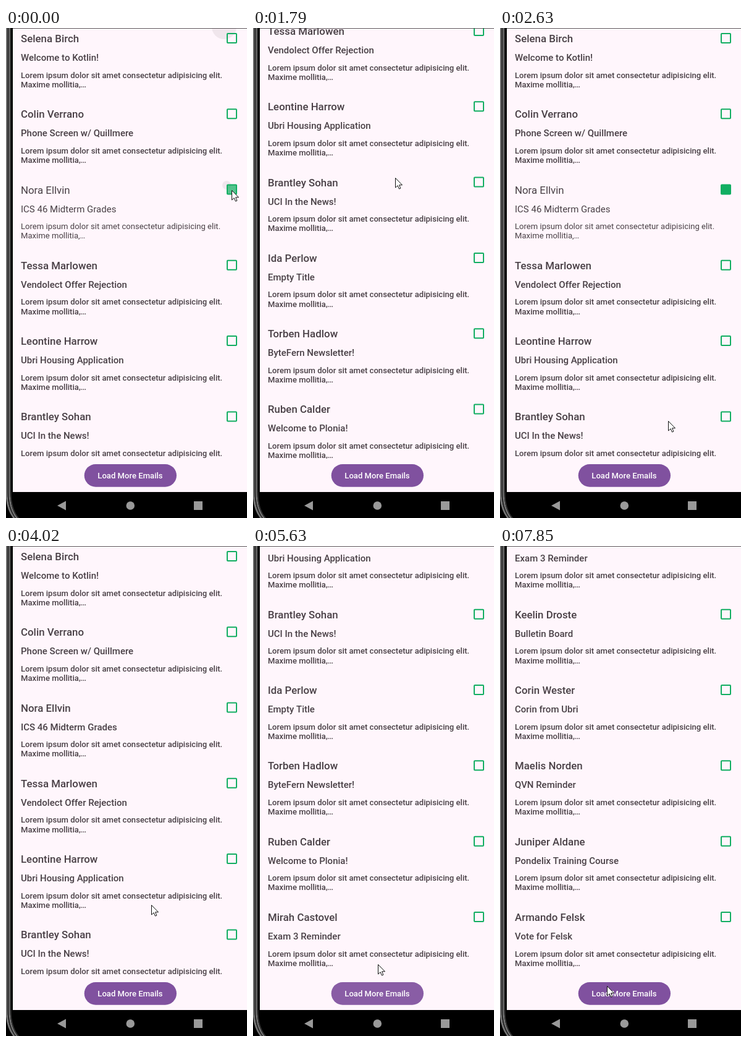
An HTML page with a canvas for the animation above (8000 ms loop, 390x792 px).

```html
<!DOCTYPE html>
<html lang="en">
<head>
<meta charset="utf-8">
<title>Email list</title>
<style>
html, body { margin: 0; width: 100%; height: 100%; overflow: hidden; background: #fff6fc; }
canvas { display: block; width: 390px; height: 792px; }
</style>
</head>
<body>
<canvas id="stage"></canvas>
<script>
const W = 390, H = 792, LOOP = 8000;
const STEP = LOOP / 58;           // the screen refreshes once per step
const PITCH = 122.28, LIST_BOTTOM = 696, NAV_TOP = 750;
const BG = '#fff6fc', INK = '#494046', GREEN = '#12ae62', PURPLE = '#80519f';
const READ_ROW = 2, UNCHECK = 27, PRESS = 39, HIT_END = 51;

const canvas = document.getElementById('stage');
const ctx = canvas.getContext('2d');
const dpr = window.devicePixelRatio || 1;
canvas.width = W * dpr;
canvas.height = H * dpr;

const mails = [
  ['Selena Birch', 'Welcome to Kotlin!'],
  ['Colin Verrano', 'Phone Screen w/ Quillmere'],
  ['Nora Ellvin', 'ICS 46 Midterm Grades'],
  ['Tessa Marlowen', 'Vendolect Offer Rejection'],
  ['Leontine Harrow', 'Ubri Housing Application'],
  ['Brantley Sohan', 'UCI In the News!'],
  ['Ida Perlow', 'Empty Title'],
  ['Torben Hadlow', 'ByteFern Newsletter!'],
  ['Ruben Calder', 'Welcome to Plonia!'],
  ['Mirah Castovel', 'Exam 3 Reminder'],
  ['Keelin Droste', 'Bulletin Board'],
  ['Corin Wester', 'Corin from Ubri'],
  ['Maelis Norden', 'QVN Reminder'],
  ['Juniper Aldane', 'Pondelix Training Course'],
  ['Armando Felsk', 'Vote for Felsk']
];
const maxScroll = count => count * PITCH - 705.2;

// A move runs from one step to another and ends at the given value; between moves the value rests.
const move = (from, to, ...end) => ({ from, to, end });

const scrolling = [
  move(6, 9, 127.3), move(9, 13, 378.8), move(16, 19, 0),
  move(30, 34, 294), move(34, 37, maxScroll(10)),
  move(43, 47, 956), move(47, 50, maxScroll(15))
];
const pointing = [
  move(0, 6, 227, 518), move(6, 9, 227, 380), move(9, 13, 230, 242), move(15, 19, 272, 635),
  move(20, 25, 360, 260), move(27, 29, 235, 580), move(30, 34, 218, 380),
  move(35, 38, 198, 716), move(40, 42, 206, 636), move(43, 47, 200, 321), move(48, 57, 173, 711)
];

function follow(start, moves, step) {
  return moves.reduce((at, { from, to, end }) => {
    const u = Math.min(1, Math.max(0, (step - from) / (to - from)));
    return at.map((v, i) => v + (end[i] - v) * u);
  }, start);
}

function rect(x, y, w, h, color) {
  ctx.fillStyle = color;
  ctx.fillRect(x, y, w, h);
}

function disc(x, y, r, color) {
  ctx.fillStyle = color;
  ctx.beginPath();
  ctx.arc(x, y, r, 0, Math.PI * 2);
  ctx.fill();
}

function polygon(points) {
  ctx.beginPath();
  for (const [x, y] of points) ctx.lineTo(x, y);
  ctx.closePath();
}

function text(str, x, y, size, weight, color = INK) {
  ctx.font = `${weight} ${size}px Roboto, sans-serif`;
  ctx.fillStyle = color;
  ctx.fillText(str, x, y);
}

function checkbox(y, fill) {
  ctx.beginPath();
  ctx.roundRect(358, y - 7.5, 15, 15, 1);
  ctx.globalAlpha = fill;
  ctx.fillStyle = GREEN;
  ctx.fill();
  ctx.globalAlpha = 1;
  ctx.strokeStyle = GREEN;
  ctx.lineWidth = 2;
  ctx.stroke();
}

function drawMail([name, title], y, read, fill) {
  const weight = read ? 400 : 500;
  text(name, 24, y + 23, 16.85, weight);
  text(title, 24, y + 53, 15, weight);
  text('Lorem ipsum dolor sit amet consectetur adipisicing elit.', 24, y + 80.6, 13.1, weight);
  text('Maxime mollitia,…', 24, y + 95.8, 13.1, weight);
  checkbox(y + 16.5, fill);
}

function drawList(step) {
  const [scroll] = follow([0], scrolling, step);
  ctx.save();
  ctx.beginPath();
  ctx.rect(11, 1, W - 11, LIST_BOTTOM - 1);
  ctx.clip();

  const ripple = 'rgba(70, 45, 60, .08)';
  if (step === 0) {
    disc(353, -2, 20, ripple);
    disc(357, 254, 7, ripple);
  }
  if (step === UNCHECK || step === UNCHECK + 1) disc(356, 246, 8 + 11 * (step - UNCHECK), ripple);

  mails.forEach((mail, i) => {
    const y = i * PITCH - scroll;
    if (y < -110 || y > LIST_BOTTOM) return;
    const read = i === READ_ROW && step < UNCHECK;
    drawMail(mail, y, read, read ? (step ? 1 : 0.72) : 0);
  });

  const glow = Math.max(0, 1 - Math.abs(step - HIT_END) / 2);
  ctx.fillStyle = `rgba(128, 81, 159, ${0.12 * glow})`;
  ctx.beginPath();
  ctx.moveTo(11, LIST_BOTTOM);
  ctx.quadraticCurveTo(200, LIST_BOTTOM - 36 * glow, W, LIST_BOTTOM);
  ctx.fill();
  ctx.restore();
}

function drawButton(step) {
  ctx.save();
  ctx.beginPath();
  ctx.roundRect(126.7, 705, 149.3, 36.7, 18.35);
  ctx.fillStyle = PURPLE;
  ctx.fill();
  ctx.clip();
  const age = (step - PRESS) / 3;
  if (age >= 0 && age < 1) disc(199, 720, 30 + 140 * age, `rgba(255, 255, 255, ${0.2 * (1 - age)})`);
  ctx.restore();
  text('Load More Emails', 148.3, 728.2, 13.1, 500, '#fff');
}

function edge(x, width, color) {
  ctx.strokeStyle = color;
  ctx.lineWidth = width;
  ctx.beginPath();
  ctx.moveTo(x, 0);
  ctx.lineTo(x, NAV_TOP);
  ctx.quadraticCurveTo(x, 781, x + 16, 796);
  ctx.stroke();
}

function drawPhone() {
  const grey = '#999';
  rect(0, NAV_TOP, W, H - NAV_TOP, '#000');
  rect(0, 0, 11, NAV_TOP, '#000');
  ctx.fillStyle = grey;
  polygon([[83, 772], [97, 764.5], [97, 779.5]]);
  ctx.fill();
  disc(201.3, 772, 6.8, grey);
  rect(304, 765, 14, 14, grey);

  edge(1, 3, '#777');
  edge(3.5, 2, '#2a2a2a');
  edge(5.5, 2, '#808080');
  edge(7.5, 2, '#333');
  rect(11, 0, W - 11, 1, '#5c585b');
}

function drawPointer(step) {
  const [x, y] = follow([365, 262], pointing, step);
  ctx.save();
  ctx.translate(x + 0.5, y + 0.5);
  polygon([[0, 0], [0, 15.5], [3.6, 12.2], [6, 17.6], [8.4, 16.6], [6.1, 11.3], [11, 11.3]]);
  ctx.fillStyle = '#fff';
  ctx.fill();
  ctx.strokeStyle = '#111';
  ctx.lineWidth = 1;
  ctx.stroke();
  ctx.restore();
}

function frame() {
  const step = Math.floor((performance.now() % LOOP + 30) / STEP) % 58;
  ctx.setTransform(dpr, 0, 0, dpr, 0, 0);
  rect(0, 0, W, H, BG);
  drawList(step);
  drawButton(step);
  drawPhone();
  drawPointer(step);
  requestAnimationFrame(frame);
}
frame();
</script>
</body>
</html>
```
